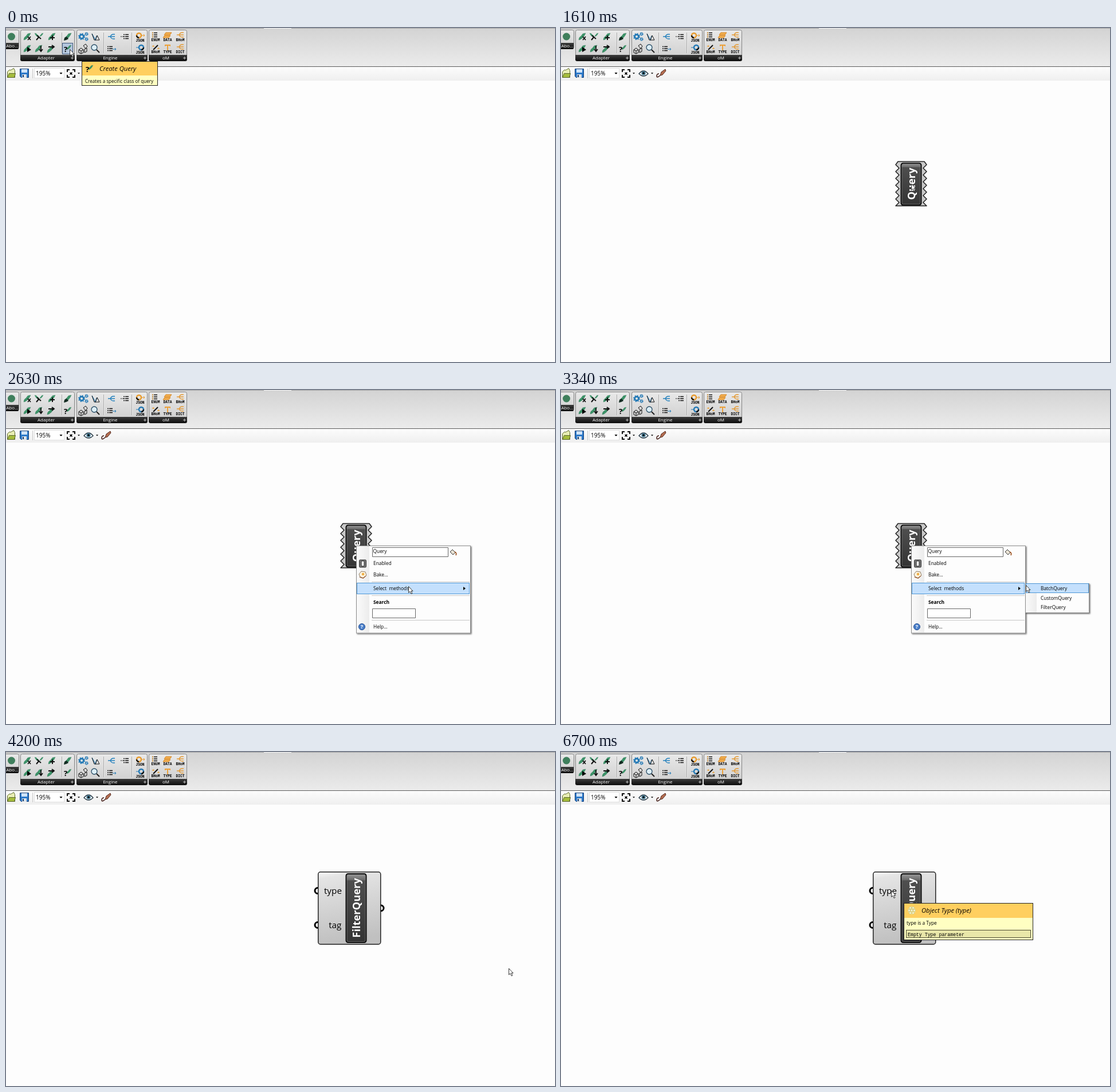
An HTML page that plays this animation: 958x584 px, repeating every 8 s.

```html
<!DOCTYPE html>
<html lang="en">
<head>
<meta charset="utf-8">
<title>Create a query component</title>
<style>
html, body { margin: 0; height: 100%; overflow: hidden; background: #fdfdfd; }
svg { display: block; font: 8.4px "Open Sans", "Noto Sans", sans-serif; }
text { white-space: pre; }
.bar { fill: #fff; font-size: 8px; text-anchor: middle; }
.tag { font: bold 6.3px "Liberation Mono", monospace; text-anchor: middle; }
.name { fill: #fff; font-size: 18.3px; font-weight: bold; text-anchor: middle; }
.port { font-size: 15.3px; text-anchor: end; }
.title { font-size: 11.2px; font-style: italic; }
.mono { font: 8.25px "Liberation Mono", monospace; }
.line { fill: none; stroke: #111; }
.blue { fill: none; stroke: #2178b5; }
.gold { fill: none; stroke: #e89a2b; }
.panel { fill: url(#panel); stroke: #858585; }
.box { fill: #fff; stroke: #666; }
.hot { fill: #c4e0fd; stroke: #4d97d6; }
</style>
</head>
<body>
<svg width="958" height="584" viewBox="0 0 958 584">
<defs>
  <linearGradient id="ribbon" x2="0" y2="1"><stop stop-color="#d3d3d3"/><stop offset="1" stop-color="#ebebeb"/></linearGradient>
  <linearGradient id="strip" x2="0" y2="1"><stop stop-color="#fcfcfc"/><stop offset="1" stop-color="#efefef"/></linearGradient>
  <linearGradient id="panel" x2="0" y2="1"><stop stop-color="#e9e9e9"/><stop offset="1" stop-color="#cdcdcd"/></linearGradient>
  <linearGradient id="black" x2="0" y2="1"><stop stop-color="#3c3c3c"/><stop offset="1" stop-color="#0c0c0c"/></linearGradient>
  <linearGradient id="body" x2=".15" y2="1"><stop stop-color="#f8f8f8"/><stop offset=".1" stop-color="#e4e4e4"/><stop offset="1" stop-color="#c0c0c0"/></linearGradient>
  <linearGradient id="core" x2="0" y2="1"><stop stop-color="#9a9a9a"/><stop offset=".09" stop-color="#6a6a6a"/><stop offset=".1" stop-color="#4e4e4e"/><stop offset="1" stop-color="#343434"/></linearGradient>
  <linearGradient id="gutter"><stop stop-color="#fafafa"/><stop offset="1" stop-color="#ececec"/></linearGradient>
  <filter id="shadow" x="-5%" y="-5%" width="115%" height="115%"><feDropShadow dx="1.5" dy="1.5" stdDeviation=".8" flood-opacity=".55"/></filter>
  <path id="plug" d="M-6 6Q-6 1-2-1L1-5 6-6 4-2 1 2Q-2 5-6 6z" fill="#3c9368" stroke="#2f7656" stroke-width=".4"/>
  <path id="drop" d="M-2.5-1h5L0 2z"/>
  <path id="rows" class="line" d="M-6-3.5h2M-6 0h2M-6 3.5h2M-3-3.5H3M-3 0H3M-3 3.5H3" stroke-width="1.6"/>
  <path id="tree" d="M-6 0h4M-2 0Q0-4 3-4h3M-2 0h8M-2 0Q0 4 3 4h3" fill="none" stroke-width="1.4"/>
  <g id="query"><use href="#plug" transform="translate(3 -2) scale(.65)"/><text x="-6" y="6" font-size="13" font-weight="bold">?</text></g>
</defs>

<rect width="958" height="67" fill="url(#ribbon)"/>
<path d="M0 .5H450M498 .5H958" stroke="#a6a6a6"/><path d="M450 .5h48" stroke="#f4f4f4"/>
<path d="M0 67.5H958" stroke="#5c5c5c"/>
<rect y="68" width="958" height="24" fill="url(#strip)"/>

<rect class="panel" x="-5.5" y="3.5" width="28" height="33" rx="3"/>
<path d="M0 26H22V35q0 2-2 2H0z" fill="url(#black)"/>
<text class="bar" x="11" y="34">Abo...</text>
<circle cx="9.5" cy="15" r="6.5" fill="#3f7f5c"/>

<g id="groups"></g>
<path d="M97.5 8v36M170.5 8v36M219.5 8v36" stroke="#aaa"/>
<path d="M98.5 8v36M171.5 8v36M220.5 8v36" stroke="#eee"/>

<rect id="pressed" x="98.5" y="26.5" width="18" height="19" fill="#b4c6dd" stroke="#40587c"/>
<g>
  <use href="#plug" x="37" y="15"/><path class="line" d="M38 15l5 6m0-6l-5 6" stroke-width="1.8"/>
  <use href="#plug" transform="translate(54 13) rotate(90) scale(.65)"/><use href="#plug" transform="translate(62 12) scale(.5)"/>
  <path class="line" d="M54 13l7 6m-8 2l5-6" stroke-width="2"/>
  <use href="#plug" x="80" y="15"/><path class="line" d="M77 17h8M81 13v8" stroke-width="2"/>
  <use href="#plug" x="108" y="15"/><path d="M101 22l1-5 4-2 3 4-4 2z" fill="#142c22"/>
  <use href="#plug" x="37" y="36"/><path d="M37 33l7 5-7 4z"/>
  <use href="#plug" x="57" y="36"/><path class="line" d="M61 31v9m-3-3l3 4 3-4" stroke-width="1.8"/>
  <use href="#plug" x="78" y="37"/><path class="line" d="M74 33h9m-3-3l4 3-4 3" stroke-width="1.8"/>
  <use href="#query" x="107" y="36"/>
</g>
<g>
  <circle class="blue" cx="132" cy="15" r="3.4" stroke-width="2.6"/><circle class="blue" cx="132" cy="15" r="5" stroke-width="2" stroke-dasharray="2 1.93"/>
  <g class="blue" stroke-width="2.2" stroke-dasharray="1.6 .5"><circle cx="140.5" cy="10.5" r="2"/><circle cx="140.5" cy="19.5" r="2"/></g>
  <path class="blue" d="M150 10l6 11 2-7" stroke-width="1.2"/><path class="line" d="M150 10l4 11h9l-4-8-3 8"/>
  <use href="#tree" x="184" y="15" stroke="#2581bd"/>
  <use href="#rows" x="211" y="15"/><path class="line" d="M200 15h6" stroke-dasharray="2 1"/>
  <path class="line" d="M127 38l4-3 4 3v5l-4 2-4-2zl4 2 4-2m-4 2v5M135 31l4-3 3 4-3 4zM137 37l4-2v6l-4 2z"/>
  <circle cx="154" cy="34" r="5" fill="#dceef7" stroke="#294d66" stroke-width="1.3"/><path d="M158 38l5 5" stroke="#222" stroke-width="2"/>
  <use href="#rows" x="183" y="36"/><path class="blue" d="M186 37h6m-2-2l2 2-2 2"/>
  <circle class="gold" cx="232" cy="13" r="4" stroke-width="2.4"/><path class="line" d="M232 17a4 4 0 0 1-4-4" stroke-width="2.4"/><path class="gold" d="M236 13h6m-2-2l2 2-2 2"/>
  <circle class="blue" cx="236" cy="34" r="4" stroke-width="2.4"/><path class="line" d="M236 38a4 4 0 0 0 4-4" stroke-width="2.4"/><path class="blue" d="M227 34h5"/>
</g>
<g>
  <use href="#rows" x="261" y="12"/><path class="gold" d="M255 8.5h2m-2 3.5h2m-2 3.5h2" stroke-width="1.6"/>
  <path d="M279 8h10l-3 4h-10zM277 13h10l-3 4h-10z" fill="#f2ae4f" stroke="#d88720"/>
  <use href="#tree" x="304" y="12" stroke="#e39a36"/>
  <path class="line" d="M257 38l8-8" stroke-width="2"/><path class="gold" d="M257 30v3m-2-1h4M266 34v3m-2-1h4"/>
  <path d="M277 29h10v3h-1l-1-1h-2v8h-2v-8h-2l-1 1h-1z" fill="#eba03a"/>
  <use href="#tree" x="304" y="33" stroke="#e39a36"/>
  <g id="tags"></g>
</g>

<g>
  <path d="M2.5 76.5l3-3h3l5-3 2 4v12h-13z" fill="#e8edb4" stroke="#59652a"/><path d="M2.5 86.5l3-7h11l-2 7z" fill="#a6bd3d" stroke="#59652a"/>
  <path d="M24.5 71.5h15v15h-13l-2-2z" fill="#2b78c9" stroke="#163f76"/><path d="M27 72h10v6H27z" fill="#cfe3f8"/><path d="M28 81h8v6h-8z" fill="#dbe1e8"/><path d="M29 82h2v4h-2z" fill="#183c6a"/>
  <path d="M46.5 71v17" stroke="#c8c8c8"/>
  <rect x="49.5" y="70.5" width="52" height="17" fill="#fff" stroke="#e0e0e0"/>
  <text x="52" y="83" font-size="10">195%</text>
  <use href="#drop" x="96" y="79"/><use href="#drop" transform="translate(127 79) scale(.8)"/>
  <path class="line" d="M107 77v-4h4m5 0h4v4m0 5v4h-4m-5 0h-4v-4" stroke-width="2"/><path d="M111 77l2 1 3-1-1 2 1 3-3-1-2 1 1-3z"/>
  <path d="M136 80q8-10 16 0-8 8-16 0z" fill="#eef5f7" stroke="#263845" stroke-width="1.3"/><circle cx="144" cy="79" r="3.6" fill="#467b94"/><circle cx="144" cy="79" r="1.7"/>
  <use href="#drop" transform="translate(159 79) scale(.8)"/>
  <path d="M182 72l-7 5-2 6 4-1 6-7z" fill="#b56d50" stroke="#542b20"/><path d="M173 83q-6 5-6 1t4-4" fill="none" stroke="#441e18" stroke-width="1.5"/>
</g>

<g id="stub">
  <path id="jagged" fill="#c9c9c9" stroke="#222" stroke-width="1.5" stroke-linejoin="round"/>
  <rect x="593.5" y="236.5" width="35" height="73" rx="3.5" fill="url(#core)" stroke="#0a0a0a" stroke-width="2"/>
  <rect x="595" y="238" width="32" height="70" rx="2.5" fill="none" stroke="#888" stroke-opacity=".6"/>
  <text class="name" transform="translate(618 272.5) rotate(-90)">Query</text>
</g>

<g id="filter">
  <g fill="#fff" stroke="#000" stroke-width="3"><circle cx="544" cy="242.5" r="5"/><circle cx="544" cy="302.5" r="5"/><circle cx="654" cy="273" r="5"/></g>
  <rect x="544.75" y="209.75" width="109" height="126.5" rx="4" fill="url(#body)" stroke="#222" stroke-width="1.5"/>
  <rect x="593.5" y="213" width="35" height="120" rx="3.5" fill="url(#core)" stroke="#0a0a0a" stroke-width="2"/>
  <rect x="595" y="214.5" width="32" height="117" rx="2.5" fill="none" stroke="#888" stroke-opacity=".6"/>
  <text class="port" x="586" y="248">type</text><text class="port" x="585.5" y="308">tag</text>
  <text class="name" transform="translate(618 272.5) rotate(-90)">FilterQuery</text>
</g>

<g id="menu">
  <rect x="611.5" y="272.5" width="199" height="152.5" fill="#fdfdfd" stroke="#8c8c8c" filter="url(#shadow)"/>
  <rect x="612" y="273" width="22" height="151" fill="url(#gutter)"/>
  <path d="M638 335.5h171M638 359.5h171M638 402.5h171" stroke="#c6c6c6"/>
  <rect id="hot" class="hot" x="612.5" width="196" height="19"/>
  <path class="box" d="M639.5 275.5h132v16h-132zM639.5 382.5h75v16h-75z"/>
  <path d="M775 283l4-4 5 5-4 4z" fill="#e9e3d5" stroke="#333"/><path d="M783 283q4 2 2 6" fill="none" stroke="#a35c2b" stroke-width="1.8"/>
  <rect x="616.5" y="297" width="12" height="13" rx="1.5" fill="#777" stroke="#333"/><rect x="620" y="299" width="5" height="9" rx="1" fill="#f4f4f4" stroke="#222"/>
  <path d="M616 322l4-5 7 1 2 6-5 5-6-2z" fill="#fff4df" stroke="#8f7d67"/><circle cx="623" cy="322" r="2.3" fill="#eead45"/><path d="M617 327l6 2 5-4" fill="none" stroke="#9c613b" stroke-width="1.5"/>
  <circle cx="621" cy="414" r="5.5" fill="#4a7fc9" stroke="#244f93"/><text x="621" y="417.3" fill="#fff" font-size="9" font-weight="bold" text-anchor="middle">?</text>
  <text x="640.5" y="285">Query</text><text x="641" y="306">Enabled</text><text x="641" y="326">Bake...</text>
  <text x="641" y="350">Select  methods</text><path d="M798 344l4 3-4 3z"/>
  <text x="641" y="374" font-weight="bold">Search</text><text x="641" y="417">Help...</text>
</g>

<g id="submenu">
  <rect x="810.5" y="338.5" width="111" height="51" fill="#fdfdfd" stroke="#8c8c8c" filter="url(#shadow)"/>
  <rect x="811" y="339" width="19" height="50" fill="url(#gutter)"/>
  <rect id="pick" class="hot" x="811.5" width="109" height="16"/>
  <text x="837" y="350">BatchQuery</text><text x="837" y="366.5">CustomQuery</text><text x="837" y="383">FilterQuery</text>
</g>

<g id="tip1">
  <rect x="132.5" y="58.5" width="132" height="42" fill="#ffffc2" stroke="#222"/><path d="M133 59h131v24H133z" fill="#ffcf5f"/>
  <use href="#query" x="145" y="71"/>
  <text class="title" x="163" y="75">Create Query</text><text x="138" y="95.5" font-size="8.1">Creates a specific class of query</text>
</g>

<g id="tip2">
  <rect x="598.5" y="264.5" width="225" height="64" fill="#ffffc2" stroke="#222"/><path d="M599 265h224v25H599z" fill="#ffcf5f"/>
  <circle cx="612" cy="277" r="7" fill="#e9d98a"/>
  <path d="M608 271h3v3h-3zM613 271h3v3h-3zM606 275.5h3v3h-3zM610.5 275.5h3v3h-3zM615 275.5h3v3h-3zM608 280h3v3h-3zM613 280h3v3h-3z" fill="#fffbe0" stroke="#b5bd78" stroke-width=".5"/>
  <text class="title" x="629" y="281">Object Type (type)</text><text x="603" y="302">type is a Type</text>
  <rect x="602.5" y="311.5" width="217" height="13" fill="#e9e7a9" stroke="#4b4a32"/>
  <text class="mono" x="605" y="321.5">Empty Type parameter</text>
</g>

<g id="cursor">
  <g id="drag"><path d="M3.5 12.5h6v4h-6z" fill="#fff" stroke="#333" stroke-dasharray="1 1"/><path d="M7.5 14.5h8v8h-8z" fill="#fff" stroke="#222"/><path d="M9.5 18.5h4m-2-2v4" stroke="#111"/></g>
  <path d="M.5.5V11.5L3 9.2 5 13.5 6.9 12.7 5 8.5H8z" fill="#fff" stroke="#222" stroke-width=".9"/>
</g>
</svg>
<script>
const $ = id => document.getElementById(id);
const show = (id, on) => $(id).style.display = on ? '' : 'none';

$('groups').innerHTML = [[25, 120, 'Adapter', 70], [123, 247, 'Engine', 182], [249, 316, 'oM', 279]].map(([l, r, name, mid]) =>
  `<rect class="panel" x="${l + .5}" y="3.5" width="${r - l - 1}" height="53" rx="3"/>
   <path d="M${l} 47H${r}v8q0 3-3 3H${l + 3}q-3 0-3-3z" fill="url(#black)"/>
   <text class="bar" x="${mid}" y="55">${name}</text>
   <path d="M${r - 7} 52.5h5m-2.5-2.5v5" stroke="#bbb"/>`).join('');

$('tags').innerHTML = [['JSON', 234, 24], ['JSON', 234, 45], ['ENUM', 261, 23], ['DATA', 282, 23], ['BHoM', 304, 23],
  ['BHoM', 261, 44], ['TYPE', 282, 44], ['DICT', 304, 44]].map(([s, x, y]) => `<text class="tag" x="${x}" y="${y}">${s}</text>`).join('');

$('jagged').setAttribute('d', 'M588 233.5H634l4 5.5' + 'l-6 6l6 6'.repeat(6) + 'H584' + 'l6-6l-6-6'.repeat(6) + 'z');

// n points slowing down from a to b; the first point lies "skip" steps after a
const glide = (n, a, b, skip) => Array.from({ length: n }, (_, i) => {
  const e = 1 - (1 - (i + skip) / (n - 1 + skip)) ** 1.5;
  return a.map((v, k) => Math.round(v + (b[k] - v) * e));
});

// [start, end, points]: the cursor jumps from point to point at an even pace
const moves = [
  [0, 0, [[111, 37]]],
  [450, 1080, glide(9, [111, 37], [601, 263], 1)],
  [1230, 1380, [[605, 267], [609, 270], [611, 272]]],
  [2250, 2480, [[624, 318], [649, 355], [672, 365], [690, 367]]],
  [2630, 2630, [[702, 343]]],
  [2780, 2780, [[701, 342]]],
  [3340, 3800, glide(7, [811, 341], [877, 378], 0)],
  [4420, 5200, [[845, 350], [780, 300], [700, 255], [620, 225], [545, 205], [490, 197],
    [466, 203], [475, 210], [497, 222], [540, 240], [580, 251]]],
  [5300, 5390, [[578, 249], [580, 246]]],
  [6230, 6230, [[577, 241]]],
  [6370, 6370, [[576, 242]]]
];
const slack = 8; // step times are rounded to 10 ms

function cursorAt(t) {
  const [a, b, pts] = moves.filter(m => m[0] <= t).pop();
  const last = pts.length - 1;
  return pts[last && Math.min(last, Math.floor((t - a + slack) / (b - a) * last))];
}

function draw(t) {
  const [x, y] = cursorAt(t), sub = t >= 3010 && t < 4200;
  $('cursor').setAttribute('transform', `translate(${x} ${y})`);
  show('drag', t >= 450 && t < 1610);
  show('pressed', t < 450);
  show('tip1', t < 450);
  show('stub', t >= 1610 && t < 4200);
  show('menu', t >= 2080 && t < 4200);
  show('submenu', sub);
  show('filter', t >= 4200);
  show('tip2', t >= 6700);

  const row = sub ? 337.5 : [293.5, 313.5, 337.5].find(r => y >= r && y < r + 19);
  show('hot', row);
  if (row) $('hot').setAttribute('y', row);
  show('pick', x >= 811);
  $('pick').setAttribute('y', 338.5 + 16.5 * Math.min(2, Math.max(0, Math.floor((y - 339) / 16.5))));
}

(function tick() {
  draw(performance.now() % 8000);
  requestAnimationFrame(tick);
})();
</script>
</body>
</html>
```
